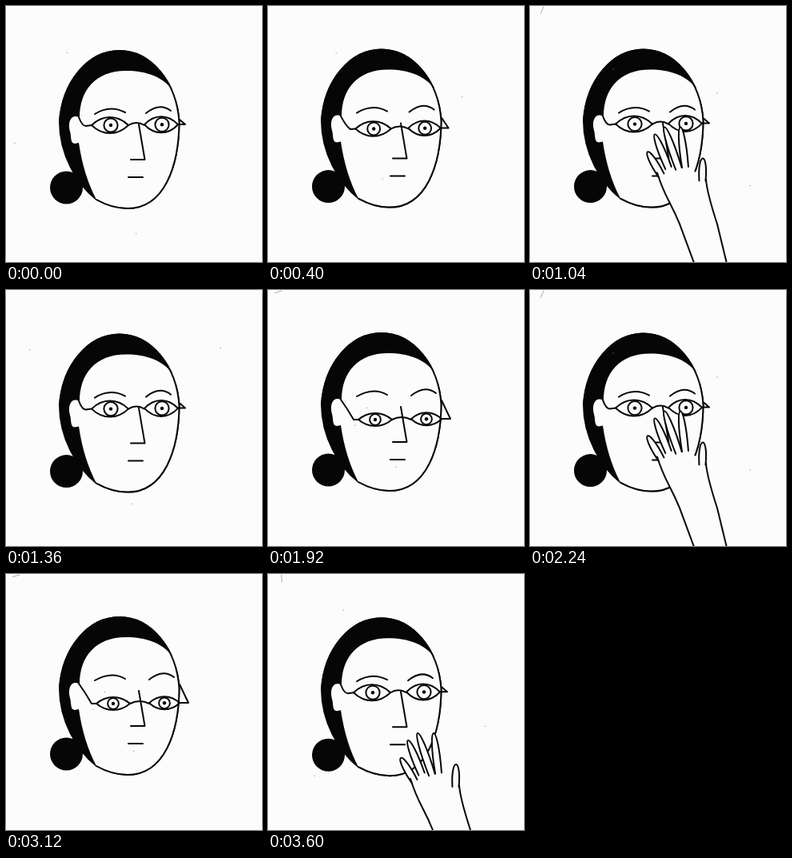
Animation, 320 px wide and 320 px high, one loop 3.68 s. Source, as an HTML page with a canvas:

```html
<!DOCTYPE html>
<html lang="en">
<head>
<meta charset="utf-8">
<title>Slipping glasses</title>
<style>
  html, body { margin: 0; height: 100%; overflow: hidden; background: #fcfcfc; }
  canvas { display: block; width: 320px; height: 320px; }
</style>
</head>
<body>
<canvas width="320" height="320"></canvas>
<script>
const ctx = document.querySelector('canvas').getContext('2d');
const INK = '#060606', PAPER = '#fcfcfc';
const STEP = 80, LOOP = 3680, POSES = 15;
const SLIDE_START = 1, SLIDE_END = 8, HAND_IN = 9, PUSHED = 12, HAND_OUT = 14;

const lerp = (a, b, t) => a + (b - a) * t;
const clamp = t => Math.max(0, Math.min(1, t));
const smooth = t => t * t * (3 - 2 * t);

function shape(d, fill, stroke = true) {
  const path = new Path2D(d);
  if (fill) { ctx.fillStyle = fill; ctx.fill(path); }
  if (stroke) ctx.stroke(path);
}

function disc(x, y, r, fill) {
  ctx.beginPath();
  ctx.arc(x, y, r, 0, 2 * Math.PI);
  ctx.fillStyle = INK;
  fill ? ctx.fill() : ctx.stroke();
}

// The right cheek and chin are shared by the head and the face.
const CHEEK = 'C216 200 198 253 152 253 C134 253 122 247 113 242';
const HEAD = `M67 145 A75 97 0 0 1 216.5 145 ${CHEEK} C88 222 67 185 67 145Z`;
const FACE = `M92 140 C92 105 112 81 150 81 C175 81 198 88 212 110 L216.5 145 ${CHEEK}
  Q97 212 91 171 L86 172 C80 172 82 163 80 157 C76 142 84 134 92 140Z`;

function drawHead(slip) {
  shape(HEAD, INK);
  shape(FACE, PAPER, false);
  shape(HEAD.split(' C88')[0]);
  disc(75.5, 227, 20.5, true);
  const lean = 4 * slip;
  shape(`M111 135 Q${130 + lean / 2} 123 149 133`);
  shape(`M${175 + lean} 134 Q${192 + lean} 120 ${206 + lean} 131`);
  shape('M166 148 L173.5 192 H156 M153 214 H171');
}

function drawEye(left, right, y, height, pupil) {
  const inset = (right - left) * 0.3, reach = height * 4 / 3;
  const lid = side => `M${left} ${y} C${left + inset} ${y + side * reach}
    ${right - inset} ${y + side * reach} ${right} ${y}`;
  shape(lid(-1) + lid(1));
  disc(pupil, y, height * 0.86);
  disc(pupil, y, 2.2, true);
}

function drawGlasses(slip) {
  const mix = (a, b) => lerp(a, b, slip);
  const y = mix(149, 164), height = mix(10, 8);
  const [l0, l1, r0, r1] = [mix(107, 113), mix(153, 155), mix(173, 179), mix(215, 217)];
  drawEye(l0, l1, y, height, mix(131, 134));
  drawEye(r0, r1, y - 0.7, height, mix(195, 198));
  shape(`M${l1} ${y} Q${(l1 + r0) / 2} ${y - 6} ${r0} ${y}`);
  shape(`M91 139 Q${mix(95, 99)} 150 ${mix(100, 107)} ${mix(150, 164)} L${l0} ${y}`);
  shape(`M217 ${mix(142, 140)} L${mix(224, 228)} ${y - 1} H${r1}`);
}

// A tapering finger, open at its base.
function drawFinger(tipX, tipY, baseX, baseY) {
  const dx = tipX - baseX, dy = tipY - baseY, length = Math.hypot(dx, dy);
  const point = (along, side) =>
    `${baseX + dx * along - dy / length * side} ${baseY + dy * along + dx / length * side}`;
  shape(`M${point(0, -4)} C${point(4 / 3, -7)} ${point(4 / 3, 7)} ${point(0, 4)}`, PAPER);
}

function drawHand(lift) {
  ctx.save();
  ctx.translate(-20 * lift, -50 * lift);
  const wrist = 'M178 256 C188 288 194 290 206 320 L232 390';
  const heel = 'L270 390 L253 320 Q240 280 239 264';
  shape(`${wrist} ${heel} L212 246 L190 250Z`, PAPER, false);
  drawFinger(235, 238, 234.5, 266);
  drawFinger(207, 199, 213, 249);
  drawFinger(187, 199, 205, 251);
  drawFinger(175, 208, 192, 250);
  drawFinger(166, 230, 183, 259);
  shape(wrist);
  shape(heel.replace('L', 'M'));
  ctx.restore();
}

// Paper dust, and a pencil scratch that turns upright while the hand is near.
function drawDust(pose) {
  let seed = 977 + pose * 7919;
  const random = () => (seed = seed * 16807 % 2147483647) / 2147483647;
  ctx.fillStyle = '#888';
  for (let i = 0; i < 3; i++) ctx.fillRect(8 + random() * 300, 30 + random() * 275, 1.2, 1);
  if (pose < SLIDE_END) return;
  const angle = lerp(0.3, 1.6, (pose - SLIDE_END) / (HAND_OUT - SLIDE_END));
  ctx.save();
  ctx.strokeStyle = '#aaa';
  ctx.lineWidth = 1;
  shape(`M17 1 l${-9 * Math.cos(angle)} ${9 * Math.sin(angle)}`);
  ctx.restore();
}

function draw(pose) {
  const slip = pose <= SLIDE_END
    ? smooth(clamp((pose - SLIDE_START) / (SLIDE_END - SLIDE_START)))
    : clamp((PUSHED - pose) / 2);
  ctx.fillStyle = PAPER;
  ctx.fillRect(0, 0, 320, 320);
  ctx.strokeStyle = INK;
  ctx.lineWidth = 2;
  ctx.lineCap = ctx.lineJoin = 'round';
  ctx.save();
  ctx.translate(0, -2 * Math.sin(Math.PI * pose / 16));
  drawHead(slip);
  drawGlasses(slip);
  ctx.restore();
  if (pose >= HAND_IN) drawHand(Math.sin(Math.PI * (pose - HAND_IN) / (HAND_OUT - HAND_IN)));
  drawDust(pose);
}

// The first pose of the loop is held for two steps.
function tick() {
  const step = Math.floor(performance.now() % LOOP / STEP);
  draw(Math.max(0, step - 1) % POSES);
  requestAnimationFrame(tick);
}
tick();
</script>
</body>
</html>
```
